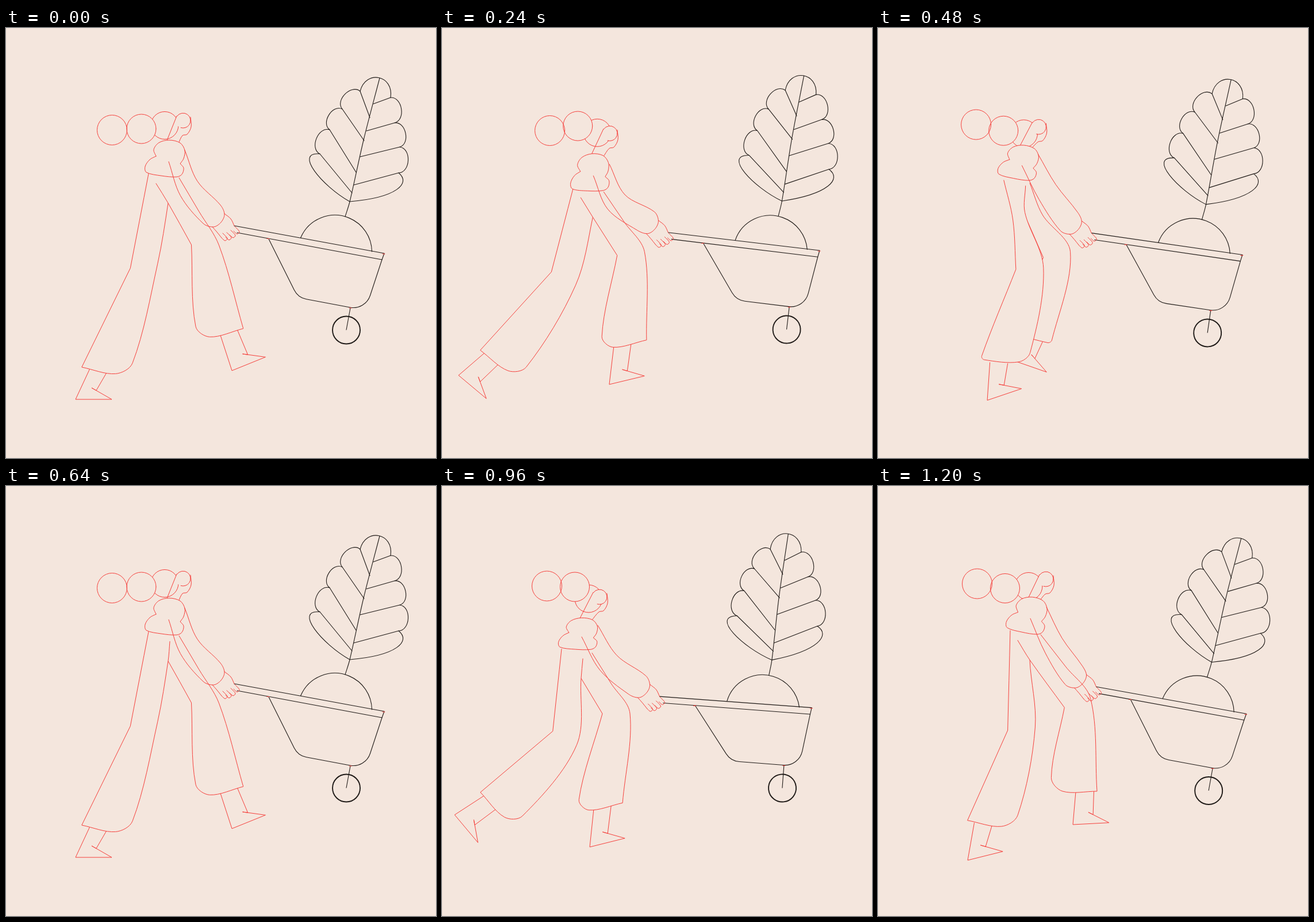
Write an HTML page with a canvas that moves like this. It is 748 by 748 pixels and loops after 1.28 s.

```html
<!DOCTYPE html>
<html lang="en">
<head>
<meta charset="utf-8">
<title>Wheelbarrow walk</title>
<style>
html, body { margin: 0; width: 100%; height: 100%; overflow: hidden; background: #f4e6dd; }
canvas { display: block; }
</style>
</head>
<body>
<canvas width="748" height="748"></canvas>
<script>
const ctx = document.querySelector('canvas').getContext('2d');
const PAPER = '#f4e6dd', RED = '#f5403c', INK = '#1f1a17';
const STEP = 80, STRIDE = 8, CYCLE = 16, DEG = Math.PI / 180;

const add = (p, x, y) => [p[0] + x, p[1] + y];
const polar = (p, deg, r) => add(p, r * Math.cos(deg * DEG), r * Math.sin(deg * DEG));
const mix = (a, b, t) => a.map((v, i) => v + (b[i] - v) * t);
const dist = (a, b) => Math.hypot(a[0] - b[0], a[1] - b[1]);
// The point (x, y) in axes turned by deg around the origin o
const local = (o, deg, x, y) => polar(polar(o, deg, x), deg + 90, y);

// Key poses by step. Body: torso x, y, height, turn; head; three hair balls; elbow bend
const BODY = {
  0: [282, 229.5, 1, 0, 308, 161, 184.5, 177.5, 235.5, 175.5, 276, 169.5, 11],
  2: [283, 245, 1.16, -7, 310, 171, 191, 182, 240, 167, 284, 168, 20],
  4: [242, 259.5, .87, -3, 274, 193, 182.5, 174, 231, 175.5, 255, 196, 12],
  7: [264, 227.5, 1, 4, 292, 162, 172.5, 170, 221, 178, 262, 174.5, 5]
};
// Leg: knee x, y, tilt; hem x, y, tilt; heel x, y; sole angle; shin lean
const LEG = {
  0: [346.5, 377.5, 1, 372, 533, -14, 393, 596, -22, -18],
  2: [349, 389.5, -13, 352, 544, -11, 325, 612, -14, 5],
  4: [303, 396, 0, 273, 560, -12, 257, 628, -14, 6],
  7: [249.5, 422.5, -6, 197, 589, 10, 156, 651, -14, 10],
  8: [240, 414, -9, 173, 598, 11, 121, 646, 0, 25],
  10: [220.5, 427.5, 20, 126, 604, 23, 63, 637, 24, 37],
  12: [213.5, 438.5, 30, 96, 563, 46, 22, 572, 50, 57],
  15: [347, 377.5, -19, 339, 531, 0, 339, 589, -3, 5]
};
// Barrow: wheel x, y; tilt
const BARROW = {
  0: [592, 525.5, 0], 1: [605.5, 522.5, -.2], 2: [605.2, 523.5, -.83],
  4: [592, 525.5, -6.2], 7: [575.2, 530, -.2]
};

// Smooth cyclic interpolation between key poses
function pose(keys, period, step) {
  const ts = Object.keys(keys).map(Number), n = ts.length;
  const time = i => ts[(i + n) % n] + period * Math.floor(i / n);
  const val = i => keys[ts[(i + n) % n]];
  const slope = (i, c) => {
    const a = time(i) - time(i - 1), b = time(i + 1) - time(i);
    return ((val(i)[c] - val(i - 1)[c]) / a * b + (val(i + 1)[c] - val(i)[c]) / b * a) / (a + b);
  };
  let i = n - 1;
  while (time(i) > step) i--;
  const h = time(i + 1) - time(i), u = (step - time(i)) / h, w = 1 - u;
  return val(i).map((p, c) =>
    p + (val(i + 1)[c] - p) * u * u * (3 - 2 * u) + h * u * w * (slope(i, c) * w - slope(i + 1, c) * u));
}

// Spline through the points; a repeated point makes a corner
function curve(pts, fill) {
  const at = i => pts[Math.max(0, Math.min(pts.length - 1, i))];
  const handle = (from, to, back) => {
    const d = dist(from, to), k = d / (d + dist(from, back)) / 3;
    return add(from, (to[0] - back[0]) * k, (to[1] - back[1]) * k);
  };
  ctx.beginPath();
  ctx.moveTo(...pts[0]);
  for (let i = 0; i < pts.length - 1; i++) {
    const a = at(i), b = at(i + 1);
    if (dist(a, b)) ctx.bezierCurveTo(...handle(a, b, at(i - 1)), ...handle(b, a, at(i + 2)), ...b);
  }
  if (fill) ctx.fill();
  ctx.stroke();
}

function lines(pts, fill) {
  ctx.beginPath();
  pts.forEach(p => ctx.lineTo(...p));
  if (fill) ctx.fill();
  ctx.stroke();
}

function arc([x, y], r, from = 0, to = 360) {
  ctx.beginPath();
  ctx.arc(x, y, r, from * DEG, to * DEG);
  ctx.stroke();
}

function disc(p, r) {
  ctx.beginPath();
  ctx.arc(...p, r, 0, 7);
  ctx.fill();
}

function pen(color, width) {
  ctx.strokeStyle = color;
  ctx.lineWidth = width;
}

function drawLeg(phase, torso) {
  const [kx, ky, kneeTilt, hx, hy, hemTilt, fx, fy, sole, lean] = pose(LEG, CYCLE, phase);
  const knee = [kx, ky], hem = [hx, hy], heel = [fx, fy];
  // 1 while the leg is in front, 0 while it trails
  const lead = Math.max(0, Math.min(1, .5 + 1.2 * Math.cos((phase - 1.5) / STRIDE * Math.PI)));

  const shinTop = polar(heel, lean - 90, 66);
  lines([shinTop, heel, local(heel, sole, 63, 0), local(heel, sole, 28, -20),
    local(heel, sole, 36, -15.5), polar(shinTop, hemTilt, 31)], true);

  const crotch = add(torso, 0, 75);
  const hipBack = add(torso, ...mix([-34, 24], [-21, 41], lead));
  const hipFront = add(torso, ...mix([3, 41], [19, 31], lead));
  const [kneeBack, kneeFront] = [-24, 24].map(w => polar(knee, kneeTilt, w));
  const [hemBack, hemFront] = [-42, 42].map(w => polar(hem, hemTilt, w));
  const round = (corner, to, r) => mix(corner, to, r / dist(corner, to));
  const backR = 24 * lead, frontR = 24 - backR;
  curve([
    hipBack, mix(mix(hipBack, kneeBack, .5), crotch, lead), kneeBack, kneeBack,
    round(hemBack, kneeBack, backR), round(hemBack, hemFront, backR),
    round(hemFront, hemBack, frontR), round(hemFront, kneeFront, frontR),
    kneeFront, mix(crotch, mix(hipFront, kneeFront, .5), lead), hipFront
  ], true);
}

function drawHead([x, y], balls, torso, tall) {
  const head = [x, y];
  arc(balls[2], 24);
  disc(balls[1], 25.5);
  arc(balls[1], 25.5);
  arc(balls[0], 26);
  disc(head, 13);
  arc(head, 13, -144, 107);
  lines([add(head, -11, -8), add(torso, -2, -34 * tall)]);
  curve([...[[13, -6], [14, 11], [7, 24], [-1, 26]].map(p => add(head, ...p)), add(torso, 18, -29 * tall)]);
}

const PUFF = [[-21, -6.5], [-25, -18], [-16, -30], [2, -34.5], [21, -29.5], [29, -16.5], [27, -2.5],
  [21, 6.5], [21, 6.5], [27, 14], [24, 25], [15, 29.5], [-12, 27.5], [-38, 21.5], [-40, 11.5], [-32, -.5], [-21, -6.5]];

function drawArm(torso, grip, bend) {
  const elbow = (a, b) => polar(mix(a, b, .5), Math.atan2(b[1] - a[1], b[0] - a[0]) / DEG + 90, bend);
  const cuff = [[-54, -4], [-36, 2], [-23, -6], [-17, -20], [-24, -36]].map(p => add(grip, ...p));
  const inner = add(torso, 1, 3), outer = add(torso, 29, -17);
  curve([inner, elbow(inner, cuff[0]), ...cuff, elbow(outer, cuff[4]), outer]);
}

function drawHand(grip) {
  const stroke = pts => curve(pts.map(p => add(grip, ...p)));
  stroke([[-17, -21], [-6, -12], [0, 0]]);
  stroke([[-38, 2], [-30, 11], [-22, 21]]);
  for (let i = 0; i < 4; i++) {
    const x = -16 + 7 * i, y = 26 - 1.3 * i * i;
    stroke([[x - 6, y - 5], [x, y], [x + 4, y - 4], [x - 4, y - 13]]);
  }
}

// Each vein runs from a notch on the leaf's edge to the stem
const LEFT_VEINS = [[[546, 219], [602, 287]], [[563, 177], [609, 251]], [[585, 141], [623, 196]], [[616, 110], [633, 156]]];
const RIGHT_VEINS = [[[669, 121], [639, 132]], [[676, 165], [627, 179]], [[685, 207], [616, 224]], [[683, 252], [605, 273]]];

function drawLeaf() {
  const veins = [...LEFT_VEINS, ...RIGHT_VEINS];
  ctx.beginPath();
  ctx.moveTo(598, 302);
  ctx.bezierCurveTo(550, 275, 500, 215, 546, 219);
  for (let i = 1; i < veins.length; i++) {
    const a = veins[i - 1][0], b = veins[i][0], depth = i === 4 ? .73 : .46;
    const dx = b[0] - a[0], dy = b[1] - a[1];
    const swell = t => add(mix(a, b, t), dy * depth, -dx * depth);
    ctx.bezierCurveTo(...swell(.04), ...swell(.96), ...b);
  }
  ctx.bezierCurveTo(705, 270, 680, 295, 598, 302);
  ctx.stroke();
  veins.forEach(v => lines(v));
  curve([[590, 328], [598, 302], [622, 195], [650, 87]]);
}

function drawBarrow([x, y, tilt]) {
  ctx.save();
  ctx.translate(x, y);
  ctx.rotate(tilt * DEG);
  pen(INK, 1.9);
  arc([0, 0], 24);
  ctx.translate(-592, -525.5);
  pen(INK, 1.1);
  lines([[397, 344], [658, 392], [654, 403], [402, 356]]);
  lines([[599, 487], [592, 525]]);
  arc([572, 390], 64.5, -157, -1);
  ctx.beginPath();
  ctx.moveTo(457, 367);
  ctx.arcTo(508, 469, 625, 491, 30);
  ctx.arcTo(625, 491, 654, 403, 31);
  ctx.lineTo(654, 403);
  ctx.stroke();
  drawLeaf();
  pen(RED, 1.1);
  [[456, 366.5], [657, 393], [599, 487]].forEach(p => lines([add(p, -2, 0), add(p, 2, 0)]));
  ctx.restore();
}

function draw(step) {
  const beat = step % STRIDE;
  const [x, y, tall, turn, headX, headY, ...rest] = pose(BODY, STRIDE, beat);
  const torso = [x, y], balls = [0, 2, 4].map(i => rest.slice(i, i + 2)), bend = rest[6];
  const cart = pose(BARROW, STRIDE, beat);
  const grip = local(cart, cart[2], -195, -181.5);

  ctx.fillStyle = PAPER;
  ctx.fillRect(0, 0, 748, 748);
  pen(RED, 1);
  drawLeg((step + STRIDE) % CYCLE, torso);
  drawLeg(step, torso);
  drawBarrow(cart);
  pen(RED, 1);
  drawHead([headX, headY], balls, torso, tall);
  curve(PUFF.map(([px, py]) => local(torso, turn, px, py * tall)), true);
  drawArm(torso, grip, bend);
  drawHand(grip);
}

ctx.lineJoin = ctx.lineCap = 'round';
const start = performance.now();
function tick() {
  draw(Math.floor((performance.now() - start) / STEP) % CYCLE);
  requestAnimationFrame(tick);
}
tick();
</script>
</body>
</html>
```
